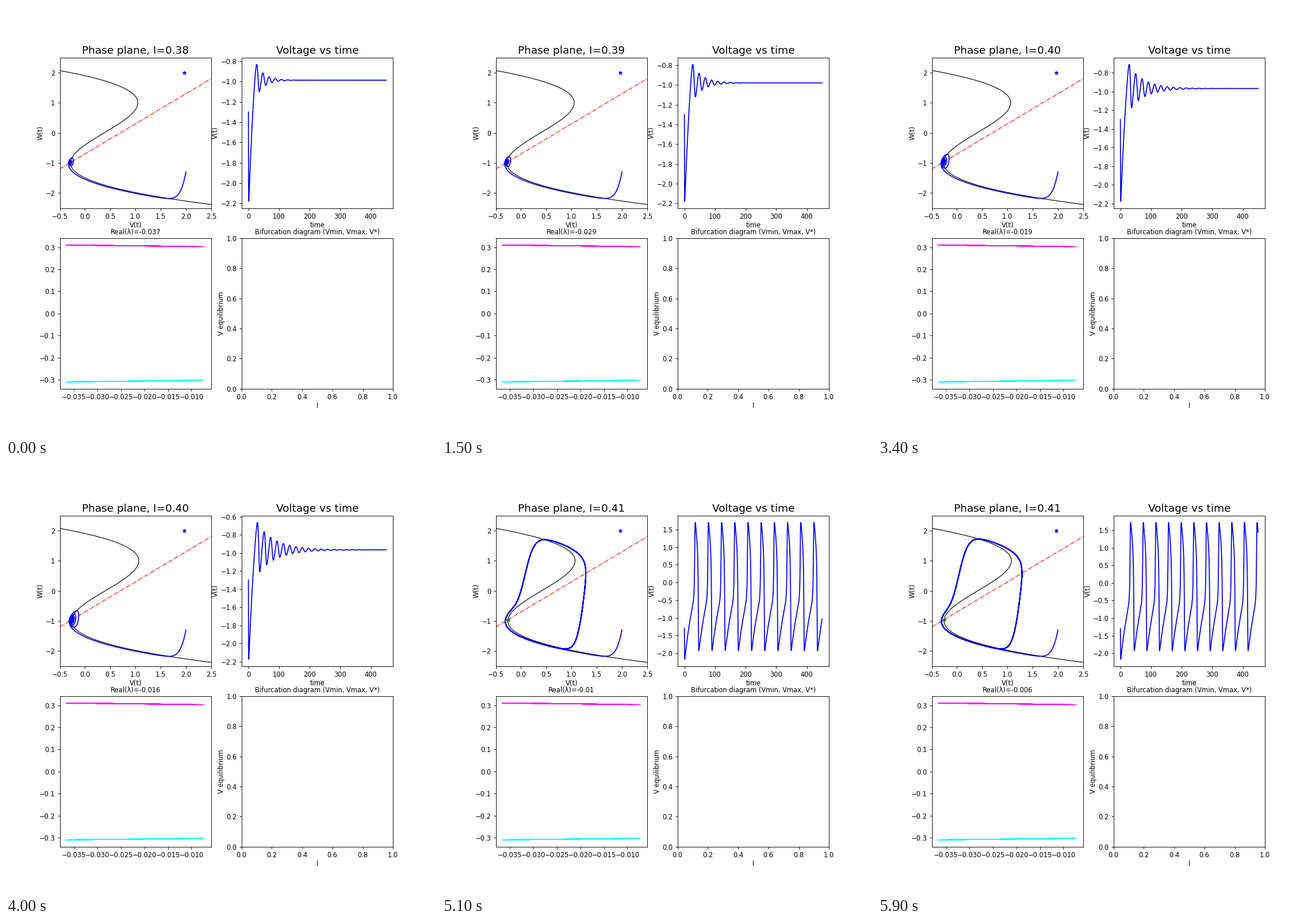
A matplotlib script that plays this animation: 748x748 px, repeating every 6 s.

```python
import numpy as np
import matplotlib.pyplot as plt
from matplotlib.animation import FuncAnimation

plt.rcParams["font.family"] = "DejaVu Sans"
plt.rcParams["axes.labelpad"] = 2

# Two-variable excitable neuron: v' = v - v^3/3 - w + I,  w' = EPS (v + A - w)
A, EPS = 0.7, 0.1
FRAMES, INTERVAL = 60, 100
T_END, DT = 450, 0.1
currents = 0.38 + 0.0005 * np.arange(FRAMES)


def slope(state):
    v, w = state
    return np.array([v - v**3 / 3 - w + currents, EPS * (v + A - w)])


def integrate():
    """Runge-Kutta paths for every current at once: (step, variable, current)."""
    steps = round(T_END / DT)
    path = np.empty((steps + 1, 2, FRAMES))
    path[0] = [[-1.3], [2.0]]
    for n in range(steps):
        s = path[n]
        k1 = slope(s)
        k2 = slope(s + DT / 2 * k1)
        k3 = slope(s + DT / 2 * k2)
        k4 = slope(s + DT * k3)
        path[n + 1] = s + DT / 6 * (k1 + 2 * k2 + 2 * k3 + k4)
    return path


time = np.linspace(0, T_END, round(T_END / DT) + 1)
paths = integrate()

# Fixed point and its complex eigenvalue pair
v_eq = np.cbrt(3 * (currents - A))
w_eq = v_eq + A
real = (1 - v_eq**2 - EPS) / 2
imag = np.sqrt(EPS * v_eq**2 - real**2)

fig, ((phase, volt), (eigen, bif)) = plt.subplots(2, 2, figsize=(9, 9), dpi=748 / 9)

phase.set(xlim=(-0.5, 2.5), ylim=(-2.5, 2.5), xlabel="V(t)", ylabel="W(t)")
v_grid = np.linspace(-2.6, 2.6, 500)
cubic, = phase.plot([], [], "k", lw=1)
phase.plot(v_grid + A, v_grid, "r-.", lw=1)
fixed, = phase.plot([], [], "g*")
orbit, = phase.plot([], [], "b", lw=1.5)
phase.plot(1.97, 2, "b*")
phase_title = phase.set_title("", fontsize=16)

trace, = volt.plot([], [], "b", lw=1.5)
volt.set(xlabel="time", ylabel="V(t)")
volt.set_title("Voltage vs time", fontsize=16)

# Growing prefixes drawn over each other thicken the older end
for k in range(1, FRAMES - 1):
    eigen.plot(real[:k], imag[:k], color="magenta", lw=1.2)
    eigen.plot(real[:k], -imag[:k], color="cyan", lw=1.2)
eigen_title = eigen.set_title("", fontsize=10)

bif.set(xlabel="I", ylabel="V equilibrium")
bif.set_title("Bifurcation diagram (Vmin, Vmax, V*)", fontsize=10)


def update(i):
    v, w = paths[:, 0, i], paths[:, 1, i]
    cubic.set_data(v_grid - v_grid**3 / 3 + currents[i], v_grid)
    fixed.set_data([w_eq[i]], [v_eq[i]])
    orbit.set_data(w, v)
    trace.set_data(time, v)
    volt.relim()
    volt.autoscale_view()
    phase_title.set_text(f"Phase plane, I={currents[i]:.2f}")
    eigen_title.set_text(f"Real(λ)={round(float(real[i]), 3)}")
    return cubic, fixed, orbit, trace, phase_title, eigen_title


anim = FuncAnimation(fig, update, frames=FRAMES, interval=INTERVAL,
                     init_func=lambda: update(0), repeat=True, repeat_delay=0)
plt.show()
```
